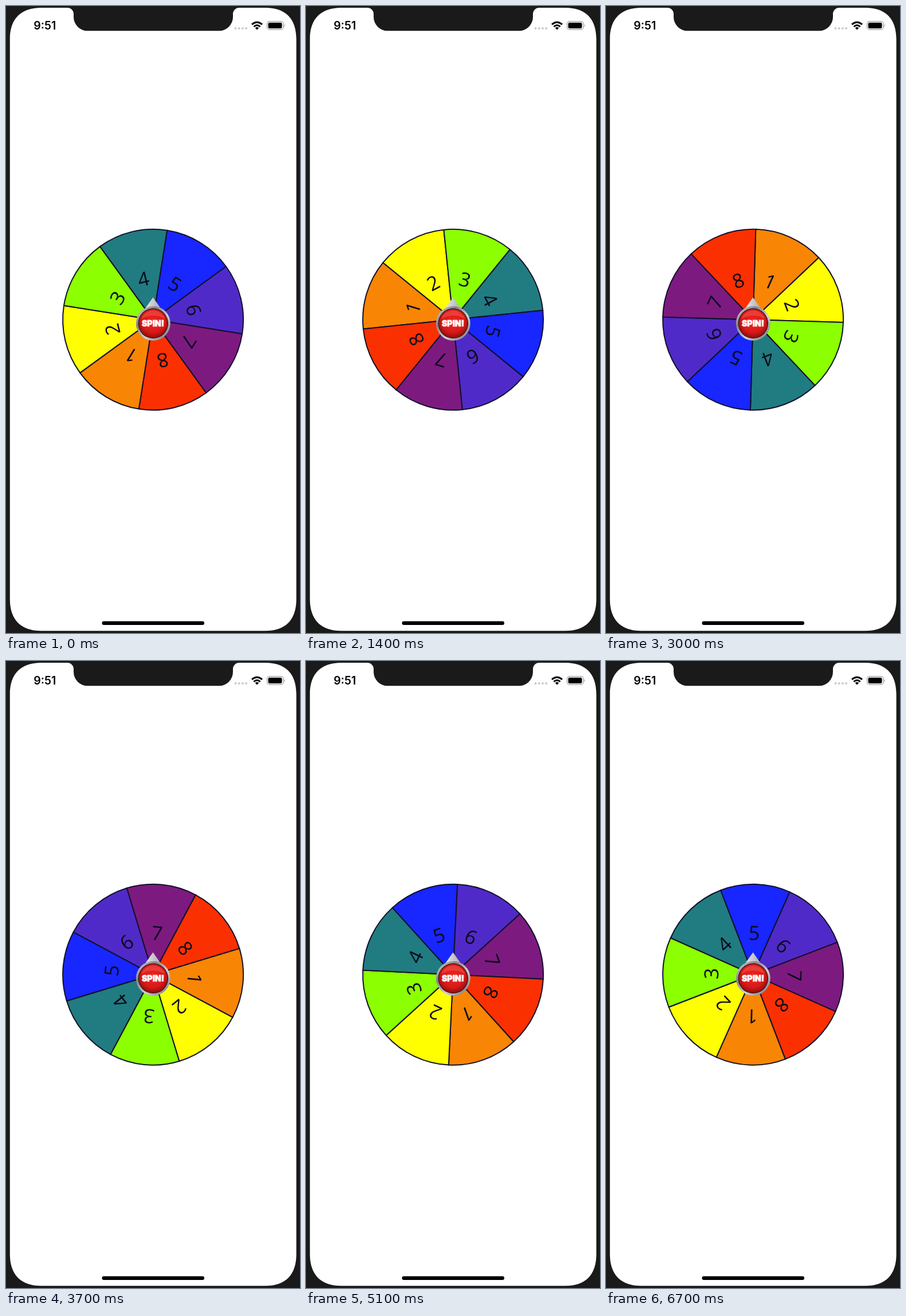
Write an HTML page that moves like this. It is 513 by 1092 pixels and loops after 6800 ms.

```html
<!DOCTYPE html>
<html lang="en">
<head>
<meta charset="utf-8">
<title>Spinning wheel</title>
<style>
  html, body { margin: 0; width: 100%; height: 100%; overflow: hidden; background: #1a1a1a; }
  svg { display: block; width: 513px; height: 1092px; }
  .soft { filter: blur(.55px); }
  .clock { font: 600 19.6px Inter, sans-serif; }
  .digit { font: 34px "Open Sans", "Noto Sans", sans-serif; text-anchor: middle; fill: #0c0a1c; }
  .spin { font: 900 14.2px Inter, sans-serif; text-anchor: middle; }
</style>
</head>
<body>
<svg viewBox="0 0 513 1092">
  <defs>
    <linearGradient id="silver" x1="0" y1="0" x2="1" y2="1">
      <stop offset="0" stop-color="#e6e6e8"/>
      <stop offset=".3" stop-color="#858389"/>
      <stop offset=".6" stop-color="#d2d0d3"/>
      <stop offset="1" stop-color="#69666c"/>
    </linearGradient>
    <linearGradient id="tip" x1="0" x2="1">
      <stop offset="0" stop-color="#e9e9ec"/>
      <stop offset="1" stop-color="#aaa9b0"/>
    </linearGradient>
    <radialGradient id="red" cx=".5" cy=".42" r=".6">
      <stop offset="0" stop-color="#ee2420"/>
      <stop offset=".65" stop-color="#d81a18"/>
      <stop offset="1" stop-color="#8c0c0c"/>
    </radialGradient>
  </defs>

  <rect width="513" height="1092" fill="#1a1a1a"/>
  <g class="soft">
    <path fill="#fff" d="M62 3H107A11 11 0 0 1 118 14V19A24.300 24.300 0 0 0 142.300 43.300H371.700A24.300 24.300 0 0 0 396 19
      V14A11 11 0 0 1 407 3H452C488 3 506.600 22 506.600 58V1033C506.600 1069 488 1088.300 452 1088.300
      H62C26 1088.300 6.800 1069 6.800 1033V58C6.800 22 26 3 62 3Z"/>

    <text class="clock" x="48.300" y="41">9:51</text>
    <g fill="#c9c9c9">
      <circle cx="400.500" cy="39" r="2"/><circle cx="406.700" cy="39" r="2"/>
      <circle cx="412.900" cy="39" r="2"/><circle cx="419.100" cy="39" r="2"/>
    </g>
    <g fill="none" stroke="#000" stroke-width="3">
      <path d="M429 32.200Q438 24.200 447 32.200"/>
      <path d="M432.400 36Q438 31 443.600 36"/>
    </g>
    <path d="M434.800 38.200Q438 35.400 441.200 38.200L438 41.500Z"/>
    <rect x="455.500" y="27" width="28.500" height="14" rx="4" fill="#fff" stroke="#a5a5a5" stroke-width="1.300"/>
    <rect x="457.500" y="29" width="24" height="10" rx="2.300"/>
    <path d="M485.500 31.500Q488 34 485.500 36.500Z" fill="#a5a5a5"/>
    <rect x="167.500" y="1071.500" width="178.500" height="6.500" rx="3.250"/>

    <g transform="translate(256.600 546.300)"><g id="wheel"></g></g>

    <path d="M256.500 507.500L271 528H242Z" fill="url(#tip)"/>
    <circle cx="256.800" cy="552.800" r="30" fill="url(#silver)"/>
    <circle cx="256.800" cy="552.800" r="26.300" fill="#3c1517"/>
    <circle cx="256.800" cy="552.800" r="25" fill="url(#red)"/>
    <path d="M236 545A22 22 0 0 1 277.600 545Q257 533 236 545Z" fill="#ff7a70" opacity=".35"/>
    <text class="spin" x="256.500" y="557.900" fill="#fff" stroke="#fbe4e2" stroke-width=".9">SPIN!</text>
  </g>
</svg>
<script>
  const LOOP = 6800, STEP = 100, REST = 166;
  const COLORS = ['#f98504', '#ffff00', '#8cff00', '#207c80', '#1826ff', '#502ac8', '#7d1a80', '#fb3000'];
  // [time in ms, degrees left before the wheel would come to rest]
  const KEYS = [[0, 2137], [1400, 621.9], [2200, 317], [3000, 164.3], [4400, 52.5], [5100, 28.2], [6700, 7]];
  const wheel = document.getElementById('wheel');
  const R = 157.5;

  function add(tag, attrs, text = '') {
    const el = document.createElementNS('http://www.w3.org/2000/svg', tag);
    for (const name in attrs) el.setAttribute(name, attrs[name]);
    el.textContent = text;
    wheel.appendChild(el);
  }

  const h = R * Math.SQRT1_2;
  COLORS.forEach((fill, i) => add('path', {
    d: `M0 0V${-R}A${R} ${R} 0 0 1 ${h} ${-h}Z`,
    transform: `rotate(${i * 45})`,
    fill, stroke: '#12102a', 'stroke-width': 2, 'stroke-linejoin': 'round'
  }));
  COLORS.forEach((_, i) => add('text', {
    class: 'digit', y: -60.5, transform: `rotate(${i * 45 + 22.5})`
  }, i + 1));

  // Friction: the remaining turn decays exponentially
  function angleAt(t) {
    let i = 0;
    while (i < KEYS.length - 2 && t >= KEYS[i + 1][0]) i++;
    const [t0, a] = KEYS[i], [t1, b] = KEYS[i + 1];
    return REST - a * Math.pow(b / a, (t - t0) / (t1 - t0));
  }

  function draw() {
    const t = Math.floor(performance.now() % LOOP / STEP) * STEP;
    wheel.setAttribute('transform', `rotate(${angleAt(t).toFixed(2)})`);
    requestAnimationFrame(draw);
  }
  draw();
</script>
</body>
</html>
```
